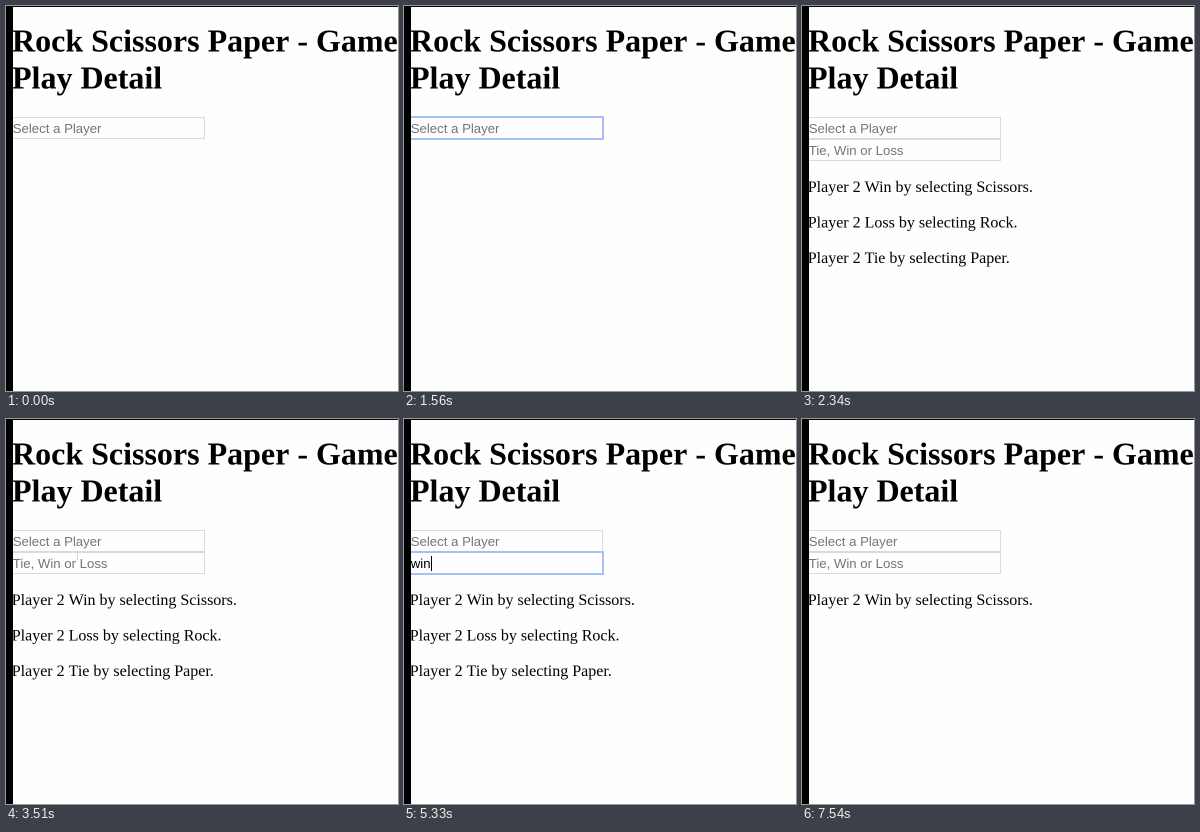
Recreate the animation shown at these times as an HTML page with a canvas. Size 392 by 385 pixels, loop 7.93 s.

```html
<!DOCTYPE html>
<html lang="en">
<head>
<meta charset="utf-8">
<title>Rock Scissors Paper - Game Play Detail</title>
<style>
  html, body { margin: 0; width: 100%; height: 100%; overflow: hidden; background: #fefefe; }
  canvas { display: block; width: 392px; height: 385px; }
</style>
</head>
<body>
<canvas id="stage" width="784" height="770"></canvas>
<script>
// Drawn at double size and scaled down, for soft edges and half-pixel baselines
const ctx = document.getElementById('stage').getContext('2d');
ctx.scale(2, 2);

const LOOP = 7930;
const TICK = 130;
const SERIF = '"Liberation Serif", "Times New Roman", serif';
const SANS = '"Liberation Sans", Arial, sans-serif';

const RESULTS = [
  ['Player 2 Win by selecting Scissors.', 186],
  ['Player 2 Loss by selecting Rock.', 221.5],
  ['Player 2 Tie by selecting Paper.', 257]
];

// Each pointer move: start, end, from [x, y], to [x, y]
const MOVES = [
  [260, 390, [97, 160], [97, 160]],
  [650, 780, [90, 136], [90, 136]],
  [2990, 3640, [84, 132], [71, 137]],
  [6760, 7540, [73, 136], [205, 405]]
];

const within = (t, start, end) => t >= start && t < end;

function text(str, x, y, font, color) {
  ctx.font = font;
  ctx.fillStyle = color;
  ctx.fillText(str, x, y);
}

function drawField(y, placeholder, { value = '', focused = false, caret = false } = {}) {
  ctx.lineWidth = 1;
  ctx.strokeStyle = '#dadada';
  ctx.strokeRect(4.5, y + 0.5, 194, 21);
  if (focused) {
    ctx.lineWidth = 2;
    ctx.strokeStyle = '#a3c1f1';
    ctx.strokeRect(4, y, 195, 22);
  }
  const x = 6.75;
  text(value || placeholder, x, y + 16, `13.2px ${SANS}`, value ? '#000' : '#757575');
  if (caret) {
    const left = value ? Math.round(x + ctx.measureText(value).width) : 7;
    ctx.fillStyle = '#000';
    ctx.fillRect(left, y + 4, 1, 15);
  }
}

function drawPointer(t) {
  const move = MOVES.find(([start, end]) => within(t, start, end));
  if (!move) return;
  const [start, end, from, to] = move;
  const steps = Math.max(1, (end - start) / TICK - 1);
  const k = Math.floor((t - start) / TICK) / steps;
  const x = Math.round(from[0] + (to[0] - from[0]) * k);
  const y = Math.round(from[1] + (to[1] - from[1]) * k);
  ctx.fillStyle = '#d2d2d2';
  ctx.fillRect(x, y - 3, 1, 7);
}

function firstField(t) {
  return {
    focused: within(t, 1040, 2340),
    value: within(t, 1950, 2340) ? '2' : '',
    caret: within(t, 1040, 1560) || within(t, 1950, 2340)
  };
}

function secondField(t) {
  const typed = within(t, 5070, 5590) ? Math.floor((t - 5070) / TICK) + 1 : 0;
  return {
    focused: within(t, 3640, 5590),
    value: 'win'.slice(0, typed),
    caret: within(t, 3640, 4160) || within(t, 4680, 5590)
  };
}

function draw(t) {
  ctx.fillStyle = '#fefefe';
  ctx.fillRect(0, 0, 392, 385);

  text('Rock Scissors Paper - Game', 6, 45.5, `bold 32px ${SERIF}`, '#000');
  text('Play Detail', 6, 82.5, `bold 32px ${SERIF}`, '#000');

  drawField(111, 'Select a Player', firstField(t));
  if (t >= 2340) {
    drawField(133, 'Tie, Win or Loss', secondField(t));
    const shown = t < 5590 ? RESULTS : RESULTS.slice(0, 1);
    for (const [line, y] of shown) text(line, 5.75, y, `16px ${SERIF}`, '#000');
  }
  drawPointer(t);

  // Window edges overlap the page
  ctx.fillStyle = '#000';
  ctx.fillRect(0, 0, 7, 385);
  ctx.fillRect(0, 0, 392, 1);
}

const began = performance.now();
function tick() {
  draw((performance.now() - began) % LOOP);
  requestAnimationFrame(tick);
}
tick();
</script>
</body>
</html>
```
